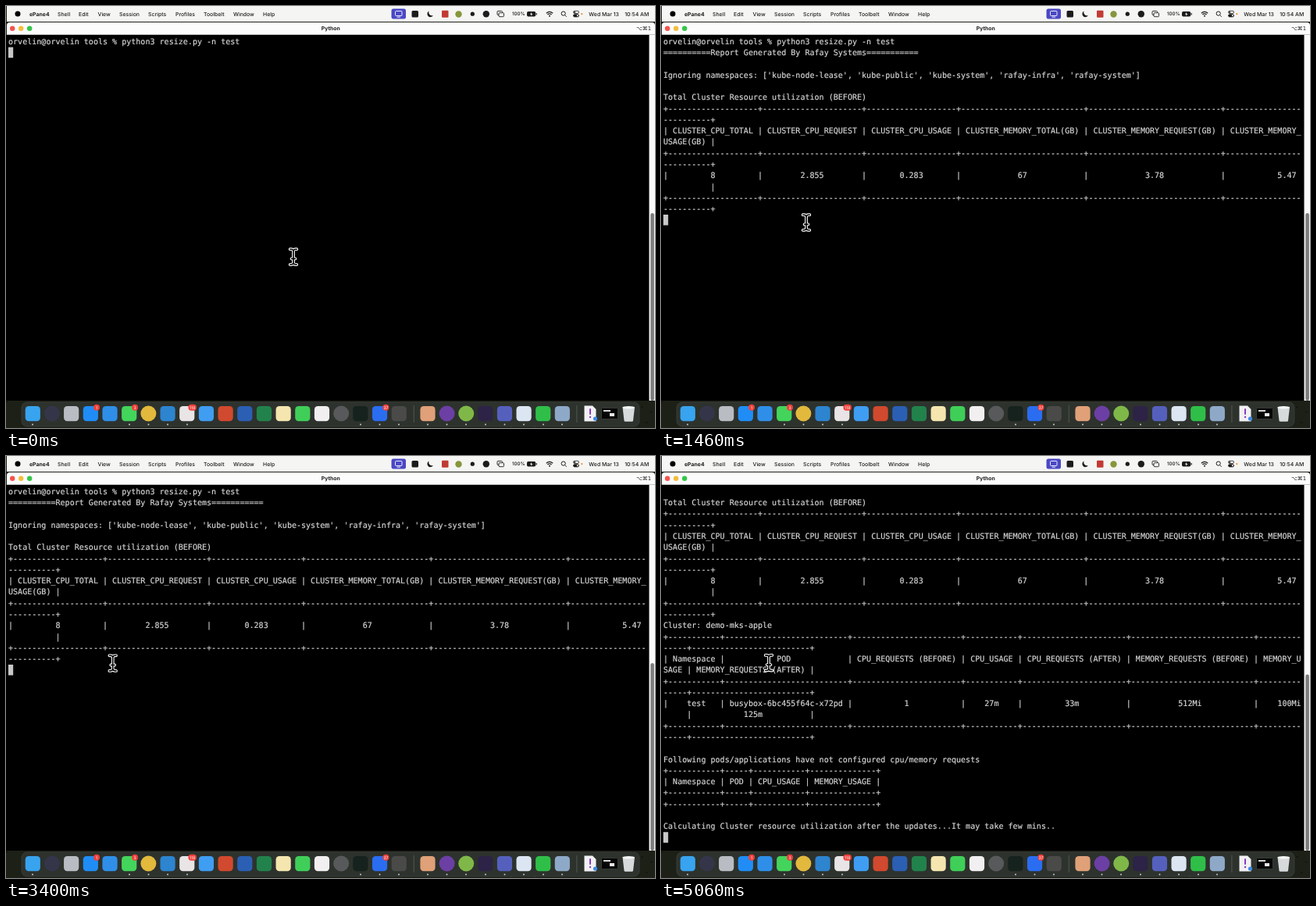
Recreate the animation shown at these times as an HTML page. Size 831x540 px, loop 5100 ms.

```html
<!DOCTYPE html>
<html lang="en">
<head>
<meta charset="utf-8">
<title>Terminal report</title>
<style>
  html, body { margin: 0; width: 100%; height: 100%; overflow: hidden; background: #000; }
  svg { display: block; width: 831px; height: 540px; }
  text { text-rendering: geometricPrecision; }
  .bar { font: 500 6.9px Inter, "Liberation Sans", sans-serif; fill: #1c1c1c; }
  .term text {
    font: 10.05px "DejaVu Sans Mono", monospace; white-space: pre;
    fill: #d6d6d6; stroke: #d6d6d6; stroke-width: 0.18;
  }
  .badge { font: 5px Inter, sans-serif; fill: #fff; text-anchor: middle; }
</style>
</head>
<body>
<svg id="stage" viewBox="0 0 831 540" xmlns="http://www.w3.org/2000/svg">
  <rect width="831" height="540" fill="#1d2017"/>
  <g id="desktop"></g>
  <rect x="1" y="21" width="830" height="30" rx="4" fill="#fcfcfc"/>
  <rect y="37" width="831" height="468" fill="#fafafa"/>
  <rect x="1" y="36" width="830" height="1" fill="#c4c4c4"/>
  <rect y="37" width="823.5" height="468" fill="#000"/>
  <rect id="thumb" x="825.3" width="4.6" rx="2.3" fill="#7d7d7d"/>
  <g id="menu" class="bar"></g>
  <g class="term">
    <g id="lines"></g>
    <rect id="block" x="3" width="6.2" height="13.6" fill="#c7c7c7"/>
  </g>
  <g id="dock"></g>
  <g id="pointer" fill="none" stroke-linecap="round" stroke-linejoin="round"></g>
</svg>
<script>
const LOOP = 5100, COLUMNS = 135, ROW = 14.285;
const $ = id => document.getElementById(id);

function add(parent, tag, attrs, text) {
  const el = document.createElementNS("http://www.w3.org/2000/svg", tag);
  for (const key in attrs) el.setAttribute(key, attrs[key]);
  if (text !== undefined) el.textContent = text;
  parent.appendChild(el);
  return el;
}
const rect = (parent, x, y, width, height, fill, rx = 0, more = {}) =>
  add(parent, "rect", { x, y, width, height, fill, rx, ...more });
const circle = (parent, cx, cy, r, fill) => add(parent, "circle", { cx, cy, r, fill });
const path = (parent, d, more) => add(parent, "path", { d, ...more });

// ---- terminal text ----
function center(text, width) {
  const spare = width - text.length;
  const left = text.length % 2 ? Math.floor(spare / 2) : Math.ceil(spare / 2);
  return " ".repeat(left) + text + " ".repeat(spare - left);
}

function table(header, ...rows) {
  const widths = header.map((h, i) => Math.max(h.length, ...rows.map(r => r[i].length)) + 2);
  const rule = "+" + widths.map(w => "-".repeat(w)).join("+") + "+";
  const line = cells => "|" + cells.map((c, i) => center(c, widths[i])).join("|") + "|";
  return [rule, line(header), rule, ...rows.map(line), rule];
}

const output = [
  "orvelin@orvelin tools % python3 resize.py -n test",
  "=".repeat(10) + "Report Generated By Rafay Systems" + "=".repeat(11),
  "",
  "Ignoring namespaces: ['kube-node-lease', 'kube-public', 'kube-system', 'rafay-infra', 'rafay-system']",
  "",
  "Total Cluster Resource utilization (BEFORE)",
  ...table(
    ["CLUSTER_CPU_TOTAL", "CLUSTER_CPU_REQUEST", "CLUSTER_CPU_USAGE",
     "CLUSTER_MEMORY_TOTAL(GB)", "CLUSTER_MEMORY_REQUEST(GB)", "CLUSTER_MEMORY_USAGE(GB)"],
    ["8", "2.855", "0.283", "67", "3.78", "5.47"]),
  "Cluster: demo-mks-apple",
  ...table(
    ["Namespace", "POD", "CPU_REQUESTS (BEFORE)", "CPU_USAGE", "CPU_REQUESTS (AFTER)",
     "MEMORY_REQUESTS (BEFORE)", "MEMORY_USAGE", "MEMORY_REQUESTS (AFTER)"],
    ["test", "busybox-6bc455f64c-x72pd", "1", "27m", "33m", "512Mi", "100Mi", "125m"]),
  "",
  "Following pods/applications have not configured cpu/memory requests",
  ...table(["Namespace", "POD", "CPU_USAGE", "MEMORY_USAGE"]),
  "",
  "Calculating Cluster resource utilization after the updates...It may take few mins.."
];
const wrapped = output.flatMap(line => line.match(new RegExp(`.{1,${COLUMNS}}`, "g")) || [""]);
const lineEls = wrapped.map((line, i) =>
  add($("lines"), "text", { x: 3, y: 48.8 + i * ROW }, line));

// ---- menu and title bar ----
function drawMenu() {
  const menu = $("menu"), dark = "#1c1c1c";
  const line = { fill: "none", stroke: dark, "stroke-width": 0.9 };
  rect($("desktop"), 1, 0, 830, 20, "#f5f5f3");
  circle(menu, 15, 10, 3.5, "#000");
  add(menu, "text", { x: 30, y: 12.6, style: "font-weight:700" }, "ePane4");
  const items = { Shell: 66, Edit: 93, View: 117.5, Session: 145, Scripts: 182,
                  Profiles: 217, Toolbelt: 253, Window: 291, Help: 329 };
  for (const name in items) add(menu, "text", { x: items[name], y: 12.6 }, name);

  rect(menu, 493.5, 3.5, 18.5, 13, "#4a48c4", 2.5);
  rect(menu, 498.5, 6.5, 8.5, 6, "none", 1, { stroke: "#fff", "stroke-width": 0.9 });
  path(menu, "M500.5 14.2h4.5", { stroke: "#fff", "stroke-width": 0.9 });
  rect(menu, 519.5, 6, 8.5, 8.5, dark, 1.5);
  path(menu, "M541.5 6.6a4 4 0 1 0 5.4 5.4a4.2 4.2 0 0 1-5.4-5.4z", { fill: dark });
  rect(menu, 558, 5.7, 8.5, 9, "#c23a34", 1);
  circle(menu, 579.5, 10.5, 4.2, "#87963c");
  circle(menu, 597.3, 10.2, 2.6, dark);
  circle(menu, 614.8, 10.2, 4.2, dark);
  rect(menu, 629, 6.5, 6.5, 5, "none", 1, line);
  rect(menu, 631, 8.7, 6.5, 5, "#f5f5f3", 1, { stroke: dark, "stroke-width": 0.9 });
  add(menu, "text", { x: 648, y: 12.3, style: "font-size:6.2px" }, "100%");
  rect(menu, 667, 7, 11.2, 6.6, dark, 1.8);
  rect(menu, 678.7, 9, 1.1, 2.6, dark, 0.5);
  path(menu, "M673.2 7.8l-2.2 3h1.6l-.6 2.2l2.4-3h-1.6z", { fill: "#fff" });
  path(menu, "M691.8 9.2q4.2-3.6 8.4 0M693.4 11q2.6-2.2 5.2 0",
    { ...line, "stroke-width": 1.2 });
  circle(menu, 696, 12.8, 1, dark);
  circle(menu, 713.7, 9.6, 2.6, "none").setAttribute("stroke", dark);
  path(menu, "M715.6 11.6l2.2 2.2", line);
  [7.9, 12.3].forEach((y, i) => {
    rect(menu, 726.5, y - 1.6, 7, 3.2, i ? dark : "none", 1.6, { stroke: dark, "stroke-width": 0.8 });
    circle(menu, i ? 731.8 : 728.2, y, 1, i ? "#fff" : dark);
  });
  circle(menu, 737.3, 10.2, 1.1, "#f0912e");
  add(menu, "text", { x: 746.3, y: 12.5 }, "Wed Mar 13");
  add(menu, "text", { x: 823.3, y: 12.5, "text-anchor": "end" }, "10:54 AM");

  ["#f4544d", "#f6bd3b", "#35c649"].forEach((fill, i) => circle(menu, 8.2 + 11 * i, 28.8, 3.2, fill));
  add(menu, "text", { x: 415.8, y: 31.2, "text-anchor": "middle", style: "font-weight:700" }, "Python");
  add(menu, "text", { x: 826, y: 31, "text-anchor": "end",
    style: "font:6.8px 'DejaVu Sans', sans-serif" }, "⌥⌘1");
}

// ---- dock ----
function drawDock() {
  const dock = $("dock");
  for (let i = 0; i < 60; i++) {
    const x = (i * 137.5) % 831, y = 506 + (i * 7.7) % 33;
    rect(dock, x, y, 2.5, 1.2, i % 3 ? "#2b301e" : "#10120b");
  }
  rect(dock, 20, 507, 791, 31, "#2d322d", 7, { stroke: "#434943", "stroke-width": 0.6 });

  const icon = (x, fill, round) => round
    ? circle(dock, x, 521.5, 10, fill)
    : rect(dock, x - 9.6, 512, 19.2, 19.2, fill, 4.4);
  const left = ["#38a3ee", "#35354a", "#b9bcc2", "#1f8df5", "#2f8fe8", "#43d45b", "#e2b93c",
    "#2d84cf", "#e9e4e6", "#3f9df2", "#d1492e", "#2b5fb4", "#22824b", "#f4e6ae", "#3fcf58",
    "#f2eff0", "#58595b", "#16221d", "#2a6df0", "#4a4a48"];
  const leftRound = [1, 6, 16];
  left.forEach((fill, i) => icon(34.3 + 24.68 * i, fill, leftRound.includes(i)));
  const right = ["#e0a078", "#6b3fa3", "#7fb848", "#2c2346", "#5560bd", "#dce6f2", "#2fbf49", "#8ea9c8"];
  right.forEach((fill, i) => icon(540 + 24.62 * i, fill, i === 1 || i === 2));

  [521.8, 730.5].forEach(x => rect(dock, x, 511, 0.8, 22, "#59605a"));
  path(dock, "M740.5 511.5h10.5l4.5 4.5v15.5h-15z", { fill: "#f1f1f4" });
  rect(dock, 747, 515, 2, 8, "#8b3dc0", 1);
  circle(dock, 748, 526, 1.2, "#8b3dc0");
  circle(dock, 754.5, 528, 2.6, "#3b8be5");
  rect(dock, 762.5, 514.5, 21, 14, "#050505", 1, { stroke: "#575b58", "stroke-width": 0.5 });
  rect(dock, 765, 517, 9, 2, "#d9d9d9");
  rect(dock, 773, 521, 6, 4, "#e8e8e8");
  path(dock, "M789.5 513.5h15.5l-2 17q-.2 1.2-1.4 1.2h-8.7q-1.2 0-1.4-1.2z", { fill: "#d7dadb" });
  add(dock, "ellipse", { cx: 797.2, cy: 513.7, rx: 7.8, ry: 1.8, fill: "#f3f4f4" });

  const running = [34, 158, 182.5, 207, 232, 454, 478.5, 503, 540, 564.5, 589, 614, 638.5, 663, 688, 712];
  running.forEach(x => circle(dock, x, 535.4, 1, "#c9cdc9"));

  [[116, "1"], [165, "3"], [238.7, "118"], [486.4, "37"]].forEach(([x, count]) => {
    const w = Math.max(8, count.length * 3.2 + 1);
    rect(dock, x - w / 2, 509.8, w, 8, "#f0413c", 4);
    add(dock, "text", { x, y: 515.6, class: "badge" }, count);
  });
}

function drawPointer() {
  const beam = "M-4.3-9.8H-3Q0-9.8 0-7Q0-9.8 3-9.8H4.3M-4.3 9.8H-3Q0 9.8 0 7Q0 9.8 3 9.8H4.3M0-7V7M-2.4 2.4H2.4";
  path($("pointer"), beam, { stroke: "#fff", "stroke-width": 3.8 });
  path($("pointer"), beam, { stroke: "#000", "stroke-width": 1.6 });
}

// ---- motion ----
const home = [368, 321];
const moves = [
  { start: 30, end: 330, steps: 10, via: [255, 221], to: [186, 277] },
  { start: 2630, end: 2700, steps: 3, via: [185, 275.5], to: [184.5, 275] },
  { start: 2930, end: 3430, steps: 14, via: [160, 268], to: [136, 265] },
  { start: 5000, end: 5060, steps: 3, via: [137, 265], to: [138, 264.7] }
];
const screens = [
  { at: 0, count: 1, scroll: 0, thumb: 265 },
  { at: 1460, count: 16, scroll: 0, thumb: 265 },
  { at: 4000, count: wrapped.length, scroll: 4, thumb: 279.5 }
];

function pointerAt(t) {
  let pos = home;
  for (const { start, end, steps, via, to } of moves) {
    if (t < start) break;
    const step = Math.floor((t - start) / (end - start) * (steps - 1) + 1e-6) + 1;
    const p = Math.min(1, step / steps), e = p * p * (3 - 2 * p);
    pos = pos.map((a, i) => (1 - e) ** 2 * a + 2 * e * (1 - e) * via[i] + e * e * to[i]);
  }
  return pos;
}

let shown;
function showScreen(screen) {
  if (screen === shown) return;
  shown = screen;
  const { count, scroll, thumb } = screen;
  lineEls.forEach((el, i) => el.style.display = i >= scroll && i < count ? "" : "none");
  $("lines").setAttribute("transform", `translate(0 ${-scroll * ROW})`);
  $("block").setAttribute("y", 38.4 + (count - scroll) * ROW);
  $("thumb").setAttribute("y", thumb);
  $("thumb").setAttribute("height", 505 - thumb);
}

function render(t) {
  showScreen(screens.filter(s => t >= s.at).pop());
  const [x, y] = pointerAt(t);
  $("pointer").setAttribute("transform", `translate(${x.toFixed(2)} ${y.toFixed(2)})`);
}

drawMenu();
drawDock();
drawPointer();
render(0);
const begin = performance.now();
(function tick() {
  render((performance.now() - begin) % LOOP);
  requestAnimationFrame(tick);
})();
</script>
</body>
</html>
```
